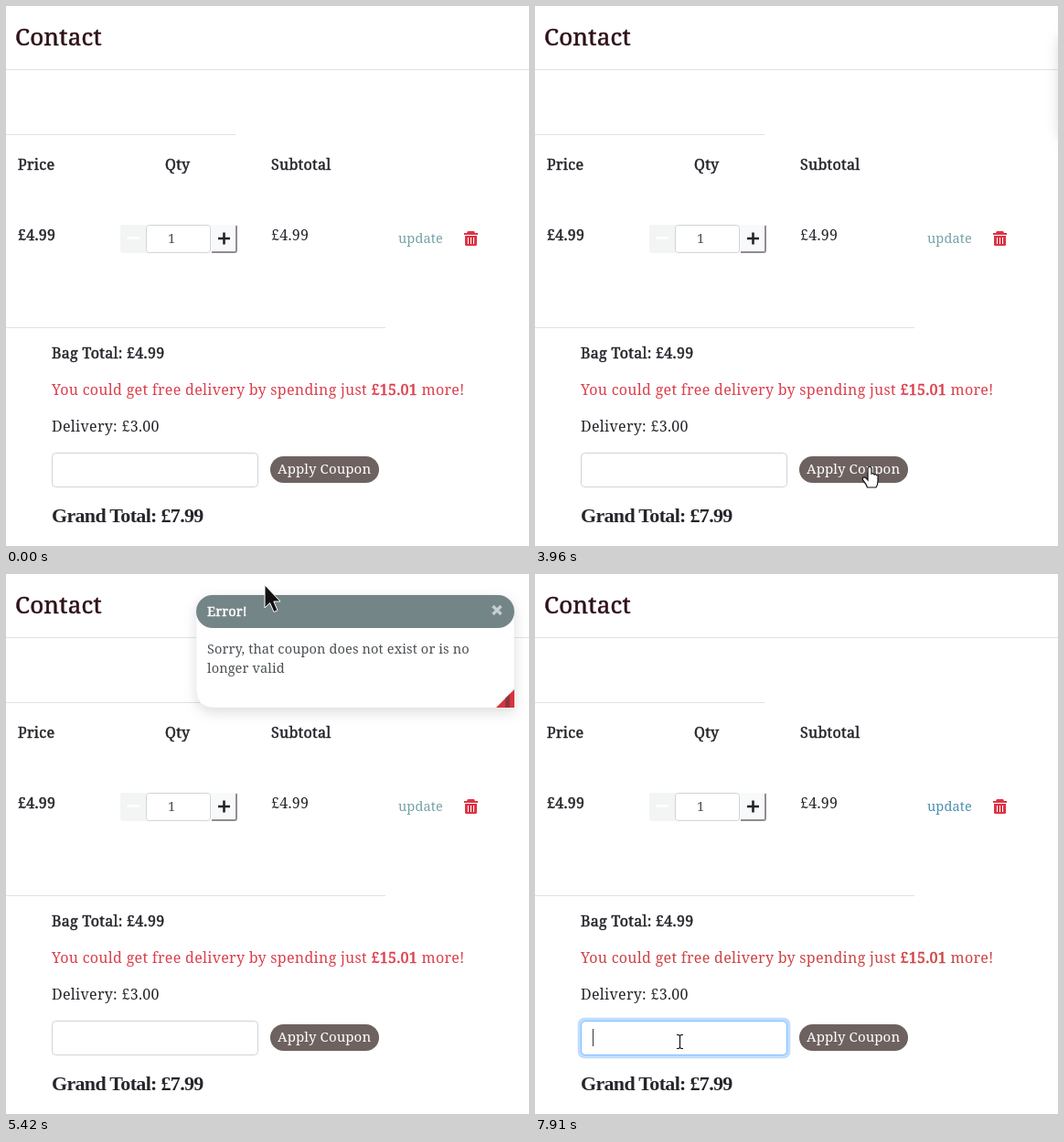
Recreate the animation shown at these times as an HTML page. Size 572 by 590 pixels, loop 8 s.

```html
<!DOCTYPE html>
<html lang="en">
<head>
<meta charset="utf-8">
<title>Shopping bag</title>
<style>
  html, body { margin: 0; width: 100%; height: 100%; overflow: hidden; background: #fff; }
  svg { display: block; width: 572px; height: 590px; --link: #73a3a9; --alert: #dc3f4d; }
  svg.focused { --link: #4a8fb3; --alert: #cc4444; }
  text { font: 16px "Noto Serif", serif; letter-spacing: .3px; fill: currentColor; color: #24262b; white-space: pre; }
  .medium { stroke: currentColor; stroke-width: .5px; }
  .title { font-size: 26px; letter-spacing: .2px; color: #2e1218; }
  .small { font-size: 14.5px; letter-spacing: .15px; color: #4b5054; }
  .alert { color: var(--alert); }
  .link { color: var(--link); }
  .light { color: #fff; }
  .button { font-size: 15px; letter-spacing: .1px; }
  .total { font: bold 22px "Liberation Serif", serif; letter-spacing: -.68px; }
  .rule { stroke: #dee2e6; }
  .field { fill: #fff; stroke: #ced4da; }
  .card { filter: drop-shadow(0 5px 7px rgba(0, 0, 0, .13)); }
</style>
</head>
<body>
<svg id="stage" viewBox="0 0 572 590">
  <path class="rule" d="M0 69.5H572M0 140.5H251M0 351.5H415"/>
  <text class="title medium" x="10" y="43">Contact</text>

  <g>
    <text class="medium" x="13" y="179">Price</text>
    <text class="medium" x="174" y="179">Qty</text>
    <text class="medium" x="290" y="179">Subtotal</text>
    <text class="medium" x="13" y="256">£4.99</text>
    <text x="290" y="256">£4.99</text>
    <text class="small link" x="429" y="259">update</text>
  </g>

  <g>
    <rect x="125" y="239" width="29" height="31" rx="3" fill="#f3f5f5"/>
    <path d="M132.5 253.5H146" stroke="#fff" stroke-width="2.5"/>
    <rect x="224" y="239" width="29" height="31" rx="3" fill="#f8f9fa"/>
    <path d="M225 269H250Q252 269 252 267V240" fill="none" stroke="#948b93" stroke-width="2"/>
    <path d="M232 254H245M238.5 247.5V260.5" stroke="#212529" stroke-width="2.6"/>
    <rect class="field" x="153.5" y="239.5" width="70" height="30" rx="3"/>
    <text class="small" x="177" y="259">1</text>
  </g>

  <g fill="#dc3545">
    <path d="M505 246H512L513 248H516V250H501V248H504Z"/>
    <path d="M502 251H515V260.5Q515 262 513.5 262H503.5Q502 262 502 260.5Z"/>
    <path d="M505.5 253V260M508.5 253V260M511.5 253V260" stroke="#fff"/>
  </g>

  <text class="medium" x="50" y="385">Bag Total: £4.99</text>
  <text class="alert" x="50" y="425">You could get free delivery by spending just <tspan class="medium">£15.01</tspan> more!</text>
  <text x="50" y="465">Delivery: £3.00</text>

  <rect class="field" x="50.5" y="488.5" width="225" height="37" rx="4"/>
  <g id="ring" fill="none">
    <rect x="48.4" y="486.4" width="229.2" height="41.2" rx="5.5" stroke="#bfdeff" stroke-width="3.4"/>
    <rect x="50.5" y="488.5" width="225" height="37" rx="4" stroke="#80bdff"/>
  </g>
  <text id="coupon" x="63" y="512" style="color:#495057"></text>
  <path id="caret" d="M.5 497V516" stroke="#33383d"/>

  <rect id="apply" x="289" y="492" width="119" height="29" rx="14.5"/>
  <text class="button light" x="297" y="511">Apply Coupon</text>
  <text class="total" x="50" y="564">Grand Total: £7.99</text>

  <g id="toast">
    <path class="card" d="M226 23H538Q556 23 556 41V146H228Q208 146 208 126V41Q208 23 226 23Z" fill="#fff" stroke="#e9ebec" stroke-width=".6"/>
    <rect x="208" y="23" width="348" height="36" rx="18" fill="#748588"/>
    <text class="small medium light" x="220" y="46" stroke-width=".7">Error!</text>
    <path d="M532.5 35L541.5 44M541.5 35L532.5 44" stroke="#c6cdcf" stroke-width="3.2"/>
    <text class="small" x="220" y="87">Sorry, that coupon does not exist or is no</text>
    <text class="small" x="220" y="108">longer valid</text>
    <path d="M556 126V146H536Z" fill="#d8333f"/>
    <path d="M546 136L551 131V146H546Z" fill="#8e3440"/>
  </g>

  <g id="pointer">
    <path data-kind="arrow" d="M0 0V25L5.6 19.6 10 29.5 14 27.7 9.8 18H17Z" fill="#111" stroke="#fff"/>
    <path data-kind="beam" d="M-3-7.5H-1L.5-6.5 2-7.5H4M.5-6.5V6.5M-3 7.5H-1L.5 6.5 2 7.5H4" fill="none" stroke="#111" stroke-width="1.2"/>
    <path data-kind="hand" d="M-2 1.5Q-2-.5 0-.5T2 1.5V7Q4 6 5 8 7 7 8 9 10 8.5 9 11V15Q9 19 7 22H-2.5Q-4 18-7 14.5-8.5 12-6.5 11-4.5 10.5-2 14Z" fill="#fff" stroke="#111" stroke-width="1.2"/>
  </g>
</svg>
<script>
const LOOP = 8000;
const RELOAD = 3960;
const WORD = "invalid";

// Each move: first step, last step, number of steps, points spaced evenly in time.
const moves = [
  [270, 610, 6, [[283, 590], [262, 560], [215, 530], [173, 516]]],
  [2940, 3220, 5, [[173, 516], [194, 515], [283, 512], [366, 504]]],
  [4300, 4720, 7, [[367, 504], [385, 420], [400, 320], [390, 240]]],
  [4780, 5550, 12, [[390, 240], [480, 222], [540, 130], [490, 35], [390, 9], [283, 12], [209, 73]]],
  [5620, 5960, 6, [[209, 73], [225, 170], [330, 236], [470, 225], [548, 185], [540, 140]]],
  [6290, 6500, 4, [[540, 140], [545, 90], [537, 38]]],
  [6840, 7050, 4, [[537, 38], [530, 50], [511, 76]]],
  [7110, 7600, 8, [[511, 76], [430, 200], [300, 390], [186, 543], [158, 511]]]
];

const [stage, ring, coupon, caret, apply, toast, pointer] =
  ["stage", "ring", "coupon", "caret", "apply", "toast", "pointer"].map(id => document.getElementById(id));

const clamp = v => Math.min(1, Math.max(0, v));
const ramp = (t, from, to) => clamp((t - from) / (to - from));
const within = (v, from, to) => v >= from && v < to;
const show = (el, on) => el.style.display = on ? "" : "none";

// Catmull-Rom curve through the points.
function along(points, u) {
  const last = points.length - 1;
  const i = Math.min(last - 1, Math.floor(u * last));
  const f = u * last - i;
  const at = k => points[Math.min(last, Math.max(0, k))];
  return [0, 1].map(axis => {
    const [a, b, c, d] = [i - 1, i, i + 1, i + 2].map(k => at(k)[axis]);
    return b + f / 2 * (c - a + f * (2 * a - 5 * b + 4 * c - d + f * (3 * (b - c) + d - a)));
  });
}

function pointerAt(t) {
  const move = moves.filter(m => m[0] <= t).pop();
  if (!move) return null;
  const [from, to, count, points] = move;
  const step = Math.floor((t - from) / (to - from) * (count - 1) + 1e-6) + 1;
  return along(points, clamp(step / count));
}

function draw(t) {
  const position = pointerAt(t);
  const [x, y] = position || [-99, -99];
  const toastOn = within(t, RELOAD, 6790);
  const overField = within(x, 50, 276) && within(y, 488, 526);
  const overApply = within(x, 289, 408) && within(y, 492, 521);
  const overClose = toastOn && within(x, 528, 546) && within(y, 31, 49);
  const kind = overField ? "beam" : overApply || overClose ? "hand" : "arrow";

  show(pointer, position);
  pointer.setAttribute("transform", `translate(${Math.round(x)} ${Math.round(y)})`);
  for (const shape of pointer.children) show(shape, shape.dataset.kind === kind);
  apply.setAttribute("fill", overApply && t < RELOAD ? "#6f7f83" : "#6e6260");

  stage.classList.toggle("focused", within(t, 880, RELOAD) || t >= 7840);
  ring.style.opacity = ramp(t, 810, 950) - ramp(t, 3430, 3490) + ramp(t, 7700, 7840);

  const typed = t >= 1810 && t < RELOAD ? Math.floor((t - 1810) / 100) + 1 : 0;
  coupon.textContent = WORD.slice(0, typed);
  show(caret, within(t, 810, 1350) || within(t, 1810, 2940) || t >= 7910);
  const end = typed ? coupon.getComputedTextLength() : 0;
  caret.setAttribute("transform", `translate(${63 + Math.round(end)} 0)`);

  show(toast, toastOn);
  const slide = clamp(Math.floor((t - RELOAD) / 66.6) * 66.6 / 460);
  toast.setAttribute("transform", `translate(${Math.round(364 * (1 - slide) ** 2)} 0)`);
  toast.style.opacity = 1 - ramp(t, 6640, 6790);
}

const start = performance.now();
function tick() {
  draw((performance.now() - start) % LOOP);
  requestAnimationFrame(tick);
}
tick();
</script>
</body>
</html>
```
